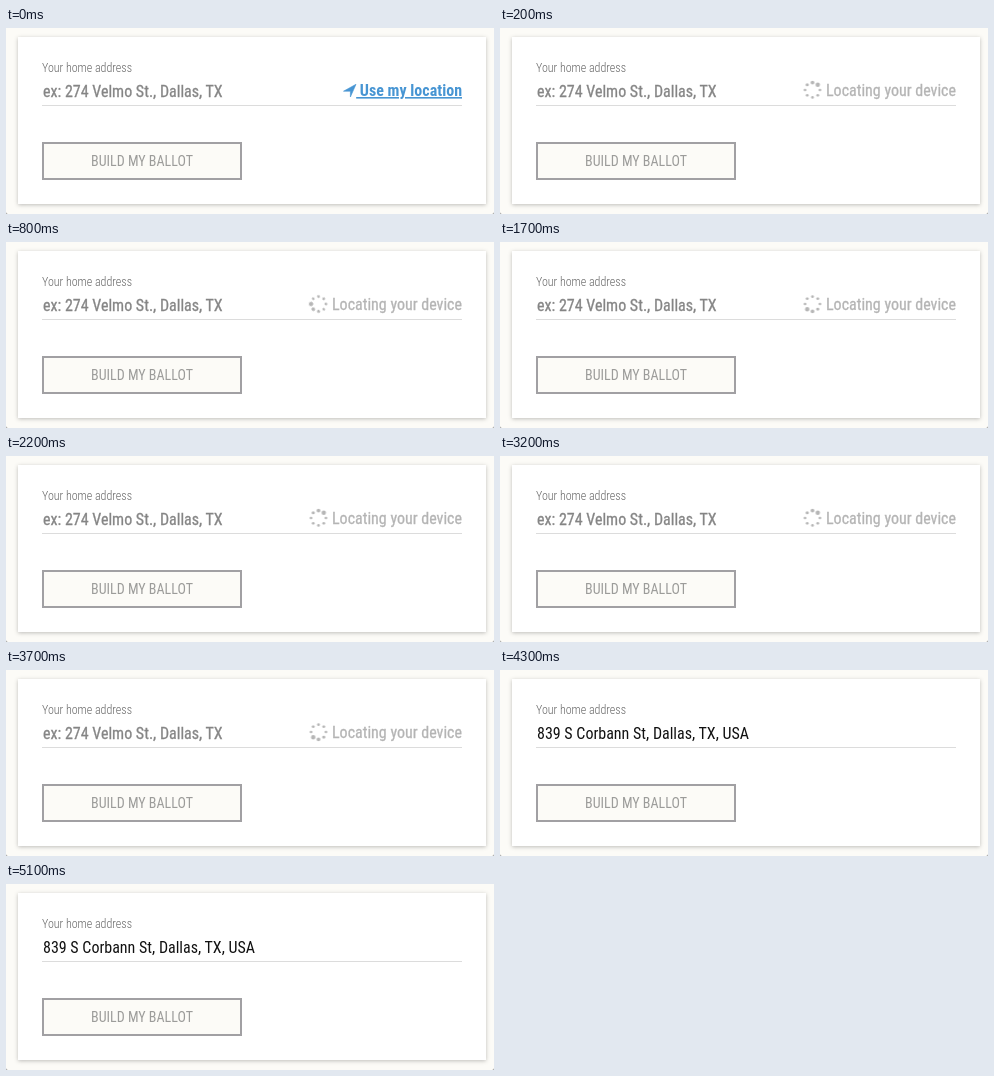
An HTML page for the animation above (5200 ms loop, 488 px wide and 186 px high).

```html
<!DOCTYPE html>
<html lang="en">
<head>
<meta charset="utf-8">
<title>Address form</title>
<style>
  html, body { margin: 0; width: 100%; height: 100%; overflow: hidden; background: #8a8a8a; }
  .stage {
    position: relative; width: 488px; height: 186px; overflow: hidden;
    background: #fcfbf7; border-radius: 0 0 2px 2px;
  }
  .card {
    position: absolute; left: 12px; top: 9px; width: 468px; height: 167px;
    background: #fff; box-shadow: 0 1px 4px rgba(0, 0, 0, .25);
  }
  svg { position: absolute; left: 0; top: 0; }
  text {
    font: 400 16px "Roboto Condensed", Roboto, sans-serif;
    font-stretch: 75%;
  }
  .wide text { letter-spacing: -.05em; }
  .label { font-size: 12px; font-weight: 300; fill: #666; }
  .hint { fill: #858585; stroke: #858585; stroke-width: .3px; }
  .address { fill: #111; }
  .link { font-weight: 700; text-decoration: underline; }
  .blue { fill: #4795d3; }
  .status { fill: #b4b4b4; }
  .status text { stroke: #b4b4b4; stroke-width: .3px; }
  .button { font-size: 14px; fill: #9c9c9a; }
</style>
</head>
<body>
<div class="stage">
  <div class="card"></div>
  <svg width="488" height="186" viewBox="0 0 488 186">
    <text class="label" x="36" y="44">Your home address</text>
    <path d="M36 77.5H456" stroke="#dcdcdc"/>
    <rect x="37" y="115" width="198" height="36" fill="#fcfbf7" stroke="#a1a0a3" stroke-width="2"/>
    <text class="button" x="136" y="138" text-anchor="middle">BUILD MY BALLOT</text>

    <text id="hint" class="hint" x="37" y="69">ex: 274 Velmo St., Dallas, TX</text>
    <text id="address" class="address" x="37" y="69">839 S Corbann St, Dallas, TX, USA</text>

    <g id="locate" class="blue">
      <path d="M350 56.3L344.4 69V63.2H337.5Z" stroke="#4795d3" stroke-width=".6" stroke-linejoin="round"/>
      <text class="link" x="456" y="68" text-anchor="end">&nbsp;Use my location</text>
    </g>
    <g id="locating" class="status">
      <g id="spinner" fill="#b6b6b6"></g>
      <text x="456" y="68" text-anchor="end">Locating your device</text>
    </g>
  </svg>
</div>
<script>
  const LOOP = 5200, TICK = 100, START = 100, FOUND = 4200;
  const byId = id => document.getElementById(id);

  // Plays [time, style] steps as hard changes, forever.
  function play(el, steps) {
    const frames = steps.map(([time, style]) => ({ ...style, offset: time / LOOP, easing: "step-end" }));
    frames.push({ ...steps[steps.length - 1][1], offset: 1 });
    el.animate(frames, { duration: LOOP, iterations: Infinity });
  }

  function showBetween(id, from, to) {
    const steps = [[0, { opacity: from > 0 ? 0 : 1 }]];
    if (from > 0) steps.push([from, { opacity: 1 }]);
    if (to < LOOP) steps.push([to, { opacity: 0 }]);
    play(byId(id), steps);
  }

  // Eight dots, growing clockwise up to the leading one at the top right.
  function drawSpinner(group) {
    const ring = 7.45, radii = [2.2, 1.36, 1.36, 1.36, 1.36, 1.36, 1.6, 1.9];
    radii.forEach((r, i) => {
      const angle = (i - 1) * Math.PI / 4;
      const dot = document.createElementNS(group.namespaceURI, "circle");
      dot.setAttribute("cx", ring * Math.cos(angle));
      dot.setAttribute("cy", ring * Math.sin(angle));
      dot.setAttribute("r", r);
      group.append(dot);
    });
  }

  function spinnerSteps() {
    const pauses = [4, 9, 13, 18, 23, 28, 33, 38];
    const steps = [];
    for (let tick = 0, turn = -2; tick * TICK <= FOUND; tick++) {
      if (tick > 0 && !pauses.includes(tick)) turn++;
      steps.push([tick * TICK, { transform: `translate(312.5px, 62px) rotate(${turn * 45}deg)` }]);
    }
    return steps;
  }

  // Tighten the tracking where no condensed face is available.
  if (byId("address").getComputedTextLength() > 226) document.body.classList.add("wide");

  drawSpinner(byId("spinner"));
  play(byId("spinner"), spinnerSteps());
  showBetween("locate", 0, START);
  showBetween("locating", START, FOUND);
  showBetween("hint", 0, FOUND);
  showBetween("address", FOUND, LOOP);
</script>
</body>
</html>
```
